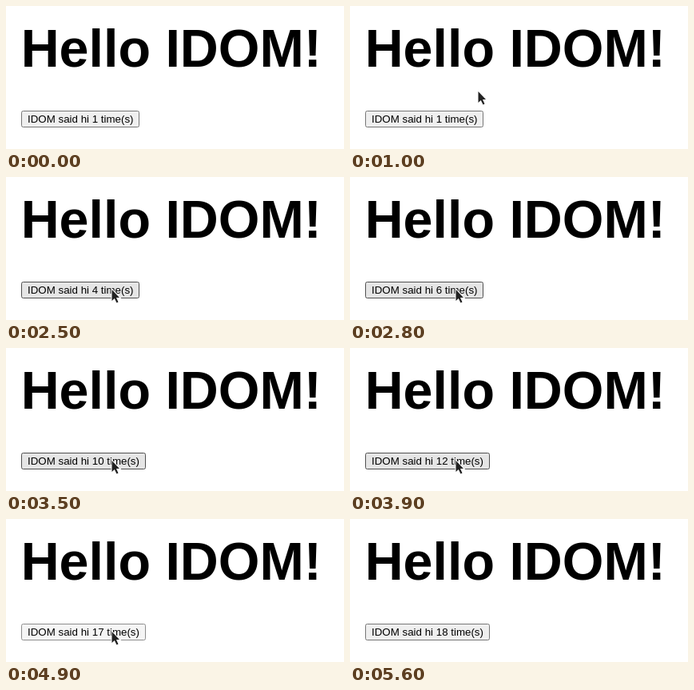
Write an HTML page that moves like this. It is 423x179 px and loops after 6.4 s.

```html
<!DOCTYPE html>
<html lang="en">
<head>
<meta charset="utf-8">
<title>Hello IDOM!</title>
<style>
html, body { margin: 0; width: 100%; height: 100%; overflow: hidden; background: #fff; }
body { position: relative; font-family: "Liberation Sans", Arial, sans-serif; color: #000; }
h1, #button, svg { position: absolute; margin: 0; white-space: nowrap; }
h1 { left: 18.67px; top: 13px; font-size: 66.4px; line-height: 80px; }
#button {
  left: 18.67px; top: 131px; height: 21px; box-sizing: border-box; padding: 0 6.67px 0 7.33px;
  border: 1px solid #767676; border-radius: 2.5px; background: #efefef;
  font-size: 13.3333px; line-height: 19px;
}
#button.hover { background: #e5e5e5; border-color: #4f4f4f; }
#button.press { background: #f5f5f5; border-color: #8d8d8d; }
svg { left: 0; top: 0; width: 423px; height: 179px; }
#cursor { fill: #222; stroke: #fff; stroke-width: 2; paint-order: stroke; }
</style>
</head>
<body>
<h1>Hello IDOM!</h1>
<div id="button"></div>
<svg viewBox="0 0 423 179"><path id="cursor"/></svg>
<script>
const LOOP = 6400, TICK = 100;
const ARROW = "M1.5 2V16L4.8 13L7.5 18.5L9.5 17.5L7 12H11Z";
const BEAM = "M-3-8.5H3V-7.5H.5V7.5H3V8.5H-3V7.5H-.5V-7.5H-3Z";

const button = document.getElementById("button");
const cursor = document.getElementById("cursor");
const clamp = (value, low, high) => Math.min(high, Math.max(low, value));

// Clicks of a steady burst that have happened by the end of a tick
const burst = (tick, start, period, total) =>
  clamp(Math.floor(((tick + 1) * TICK - 1 - start) / period) + 1, 0, total);

const countAt = tick =>
  1 + burst(tick, 2000, TICK, 1) + burst(tick, 2350, 177.5, 12) + burst(tick, 4600, 134, 4);

// Straight pointer moves: first tick, duration in ticks, destination
const entry = { x: 223, y: -2 };
const moves = [
  { from: 6, span: 1, x: 201, y: 65 },
  { from: 8, span: 4, x: 116, y: 145 },
  { from: 13, span: 2, x: 118, y: 141 },
  { from: 17, span: 3, x: 131, y: 139 },
  { from: 53, span: 2, x: 152, y: 49 }
];

function pointerAt(tick) {
  return moves.reduce((at, move) => {
    const k = clamp((tick - move.from) / move.span, 0, 1);
    return { x: at.x + (move.x - at.x) * k, y: at.y + (move.y - at.y) * k };
  }, entry);
}

function draw(tick) {
  const { x, y } = pointerAt(tick);
  const visible = tick >= 6 && tick < 56;
  const hover = visible && y >= 131;
  const count = countAt(tick);
  const press = tick > 23 && countAt(tick + 1) > count && countAt(tick - 1) === count;

  button.textContent = `IDOM said hi ${count} time(s)`;
  button.className = press ? "press" : hover ? "hover" : "";
  cursor.style.display = visible ? "" : "none";
  cursor.setAttribute("d", y > 20 && y < 91 ? BEAM : ARROW);
  cursor.setAttribute("transform", `translate(${Math.round(x)} ${Math.round(y)})`);
}

const start = performance.now();
function frame() {
  draw(Math.floor((performance.now() - start) % LOOP / TICK));
  requestAnimationFrame(frame);
}
frame();
</script>
</body>
</html>
```
